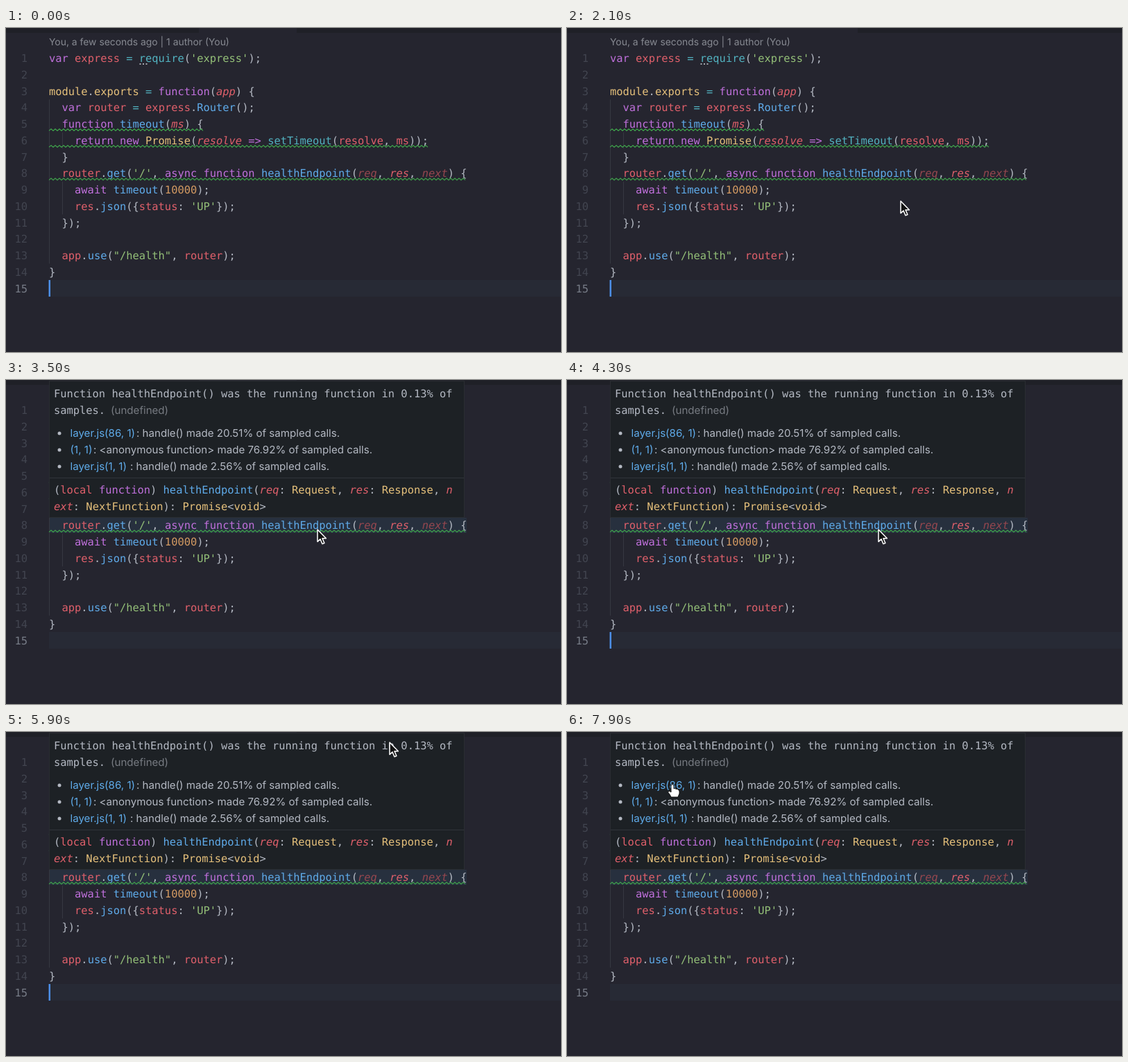
These frames come from a looping animation (800x468 px, 8 s). An HTML page:

```html
<!DOCTYPE html>
<html lang="en">
<head>
<meta charset="utf-8">
<title>Code editor hover</title>
<style>
html, body { margin: 0; height: 100%; overflow: hidden; background: #25252f; }
svg { display: block; width: 100vw; height: 100vh; }
text { white-space: pre; fill: #b4b9c3; text-rendering: geometricPrecision; }
.mono { font: 15.4px "DejaVu Sans Mono", monospace; }
.sans { font: 15.1px Inter, sans-serif; }
.num { fill: #424550; text-anchor: end; }
.wave { fill: none; stroke: #3fa34b; stroke-width: 1.2; }
.p { fill: #c070dc; }
.r, .R { fill: #e0606b; }
.D { fill: #95474f; }
.b { fill: #5fabea; }
.g { fill: #94c078; }
.y { fill: #e5c07b; }
.o { fill: #d39a62; }
.c { fill: #52b2c0; }
.R, .D { font-style: italic; }
.dim { fill: #777b82; }
</style>
</head>
<body>
<svg id="stage" viewBox="0 0 800 468" preserveAspectRatio="none"></svg>
<script>
const LOOP = 8000, ROW = 23.73;
const baseline = n => 49.3 + ROW * (n - 1);

// k~text~ colours text with class k
const paint = s => s.replace(/(\w)~(.*?)~/g, '<tspan class="$1">$2</tspan>');
const text = (x, y, s, cls = 'mono') => `<text x="${x}" y="${y}" class="${cls}">${paint(s)}</text>`;
const rect = (x, y, w, h, fill, extra = '') =>
  `<rect x="${x}" y="${y}" width="${w}" height="${h}" fill="${fill}" ${extra}/>`;

const code = [
  "p~var~ r~express~ c~=~ c~require~(g~'express'~);",
  "",
  "y~module~.y~exports~ c~=~ p~function~(R~app~) {",
  "  p~var~ r~router~ c~=~ r~express~.b~Router~();",
  "  p~function~ b~timeout~(R~ms~) {",
  "    p~return new~ y~Promise~(R~resolve~ p~=>~ c~setTimeout~(r~resolve~, r~ms~));",
  "  }",
  "  r~router~.b~get~(g~'/'~, p~async function~ b~healthEndpoint~(D~req~, R~res~, D~next~) {",
  "    p~await~ b~timeout~(o~10000~);",
  "    r~res~.b~json~({r~status~: g~'UP'~});",
  "  });",
  "",
  "  r~app~.b~use~(g~\"/health\"~, r~router~);",
  "}",
  ""
];

function wave(row, end) {
  const y = baseline(row) + 4.2;
  let d = `M62 ${y}`;
  for (let x = 65, up = true; x <= end; x += 3, up = !up) d += `L${x} ${y + (up ? -2.6 : 0)}`;
  return `<path class="wave" d="${d}"/>`;
}

const guide = (x, from, to) =>
  rect(x, baseline(from) - 17.3, 1, ROW * (to - from + 1), '#363841');

const bullet = (y, link, tail, x) =>
  `<circle cx="77" cy="${y - 5}" r="2.5" fill="#b4b9c3"/>` +
  text(92.5, y, `b~${link}~`, 'sans') + text(x, y, tail, 'sans');

const tooltip = rect(62.5, 1.5, 598, 197, '#1d2125', 'stroke="#2a2d32"') +
  rect(63, 141, 597, 1, '#30343a') +
  text(69, 25, 'Function healthEndpoint() was the running function in 0.13% of') +
  text(69, 49, 'samples.') + text(151, 49, '(undefined)', 'sans dim') +
  bullet(82, 'layer.js(86, 1)', ': handle() made 20.51% of sampled calls.', 188) +
  bullet(106, '(1, 1)', ': &lt;anonymous function> made 76.92% of sampled calls.', 126) +
  bullet(130, 'layer.js(1, 1)', ': handle() made 2.56% of sampled calls.', 179) +
  text(69, 164, '(r~local~ p~function~) b~healthEndpoint~(R~req~: y~Request~, R~res~: y~Response~, R~n~') +
  text(69, 188, 'R~ext~: y~NextFunction~): y~Promise~&lt;y~void~>');

stage.innerHTML =
  rect(0, 0, 278, 7, '#1f2027') + rect(419, 0, 381, 7, '#1f2027') +
  rect(62, 364, 738, 24, '#272a35') +
  rect(62, 199, 602, 22, '#27303e', 'id="hot"') +
  guide(62, 4, 13) + guide(81, 6, 6) + guide(81, 9, 10) +
  text(62, 25, 'You, a few seconds ago | 1 author (You)', 'sans dim" style="font-size:13.9px;fill:#878a92') +
  code.map((line, i) =>
    text(31, baseline(i + 1), `${i + 1}`, 'mono num' + (i === 14 ? '" style="fill:#777c87' : '')) +
    text(62, baseline(i + 1), line)).join('') +
  [193.5, 198, 202.5].map(x => rect(x - 1, 51, 2, 2, '#a5a9b0')).join('') +
  wave(5, 284) + wave(6, 608) + wave(8, 664) +
  `<g id="tip">${tooltip}</g>` +
  rect(61.5, 364, 2.5, 24, '#4c8ee6', 'id="caret"') +
  `<g id="mouse" stroke-linejoin="round">
    <path id="arrow" d="M0 0V17.6L4 13.8L6.9 20.8L9.9 19.5L7 12.7H12.4Z" fill="#111" stroke="#fff" stroke-width="1.5"/>
    <path id="hand" d="M-2 1Q0-2 2 1V6Q4 4.500 5 6.500Q7 5.500 8 7.500Q10 7 10 10V13Q9 15 8 18H-2Q-3 15-6 11.500Q-7 8.500-4 9.500L-2 11Z" fill="#fff" stroke="#111"/>
  </g>`;

// time, x, y of the pointer tip
const path = [
  [1700, 530, 440], [2100, 481, 250], [2500, 449, 216], [4700, 449, 216],
  [5350, 558, 13], [5900, 553, 15], [6400, 545, 18], [7250, 260, 45], [7700, 152, 76], [LOOP, 152, 76]
];

function pointer(t) {
  const i = Math.max(1, path.findIndex(k => k[0] > t));
  const [t0, x0, y0] = path[i - 1], [t1, x1, y1] = path[i];
  const u = (t - t0) / (t1 - t0), e = u * u * (3 - 2 * u);
  return [x0 + (x1 - x0) * e, y0 + (y1 - y0) * e];
}

const $ = id => document.getElementById(id);
const show = (id, on) => $(id).setAttribute('visibility', on ? 'visible' : 'hidden');

function draw(now) {
  const t = now % LOOP;
  const blink = t < 5000 ? t / 1000 : (t - 5450) / 940 + 1;
  show('caret', blink % 1 < 0.5);
  show('tip', t >= 2800);
  show('hot', t >= 2800);
  const [x, y] = pointer(t), seen = t >= 1700;
  const onLink = t >= 2800 && x > 92 && x < 188 && y > 68 && y < 88;
  $('mouse').setAttribute('transform', `translate(${x} ${y})`);
  show('arrow', seen && !onLink);
  show('hand', seen && onLink);
}

const start = performance.now();
(function tick() {
  draw(performance.now() - start);
  requestAnimationFrame(tick);
})();
</script>
</body>
</html>
```
